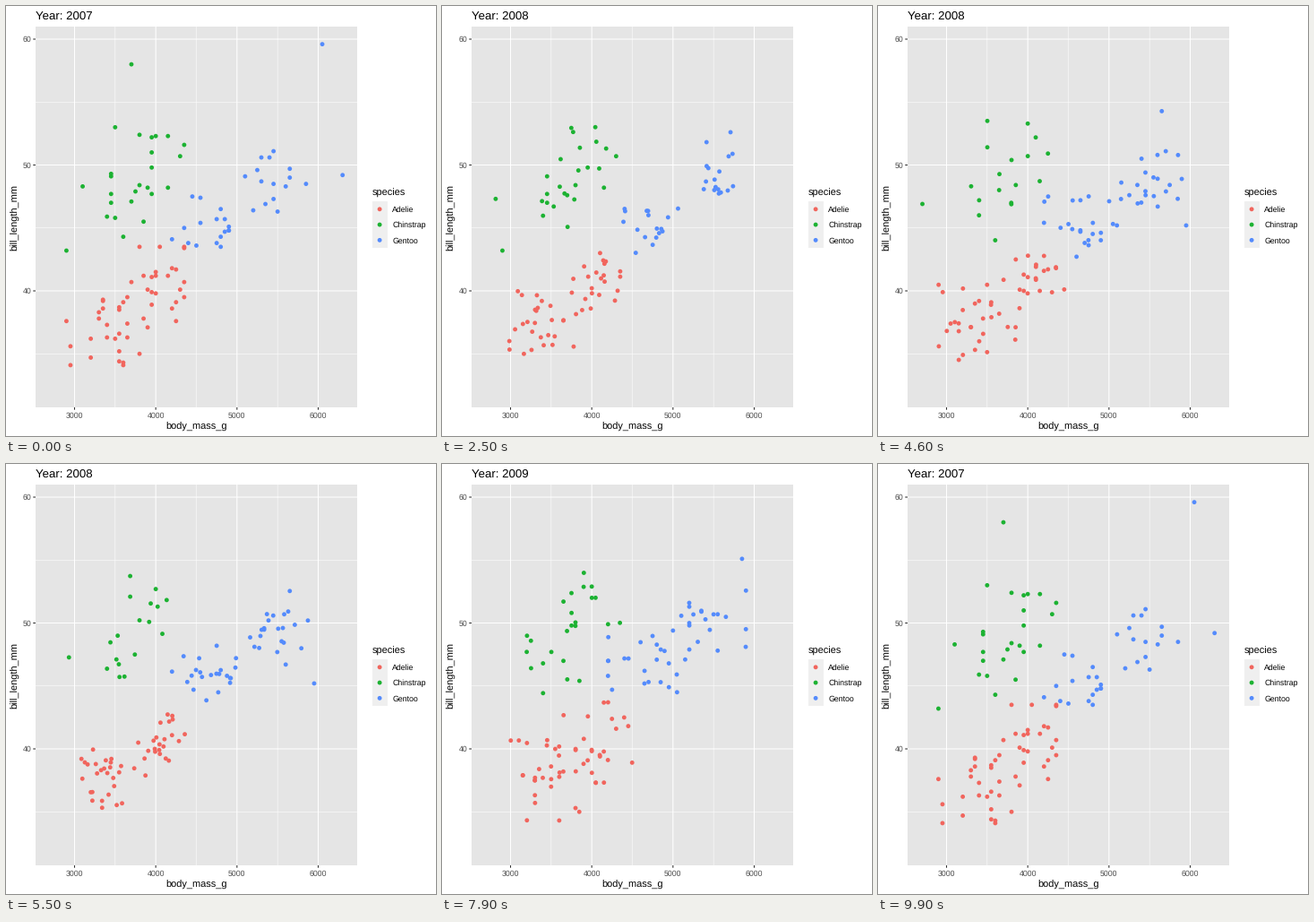
Write a matplotlib script that moves like this. It is 480 px wide and 480 px high and loops after 10 s.

```python
import numpy as np
import matplotlib.pyplot as plt
from matplotlib.animation import FuncAnimation
from matplotlib.patches import Rectangle

plt.rcParams["font.family"] = "Liberation Sans"
plt.rcParams["text.hinting"] = "none"

STAGE = 480
LEFT, RIGHT, TOP, BOTTOM = 33, 392, 23, 448
COLORS = {"Adelie": "#F1655D", "Chinstrap": "#1CB232", "Gentoo": "#548BFC"}
DOT = 4.85 ** 2
YEARS = (2007, 2008, 2009)
MOVES = ((11, 33), (45, 66), (78, 99))
TITLE_CHANGES = (23, 56, 90)

rng = np.random.default_rng(12)


def px(mass):
    return 76.5 + (mass - 3000) * 0.09067


def py(bill):
    return 37 + (60 - bill) * 14.05


def cloud(n, mass, bill, gap, noise):
    """Females and males alternate; males are heavier with longer bills."""
    sex = np.where(np.arange(n) % 2, 1, -1)
    e = np.clip(rng.normal(size=(n, 2)), -1.7, 1.7)
    pts = np.array([mass, bill]) + sex[:, None] * gap + e * noise
    return np.round(pts / (50, 0.1)) * (50, 0.1)


def species(counts, mass, bill, gap, noise, rise):
    """One cloud per year; bills are longer in the last year by `rise`."""
    bills = (bill, bill, bill + rise)
    return [cloud(n, mass, b, gap, noise) for n, b in zip(counts, bills)]


STATES = {
    "Adelie": species((49, 50, 52), 3700, 38.8, (330, 1.5), (270, 1.9), 0.2),
    "Chinstrap": species((26, 18, 24), 3740, 48.8, (190, 2.1), (260, 1.6), 0.4),
    "Gentoo": species((34, 45, 43), 5070, 46.9, (390, 1.8), (270, 1.4), 1.5),
}

# The few outliers that shape the silhouette.
gentoo, chinstrap = STATES["Gentoo"], STATES["Chinstrap"]
gentoo[0][17] = 6300, 49.2
gentoo[0][33] = 6050, 59.6
gentoo[1][29] = 5650, 54.3
gentoo[1][44] = 5950, 45.2
gentoo[2][35] = 5850, 55.1
chinstrap[0][17] = 3700, 58
chinstrap[0][22] = 2900, 43.2
chinstrap[1][12] = 2700, 46.9

fig = plt.figure(figsize=(STAGE / 72, STAGE / 72), dpi=72, facecolor="white")
ax = fig.add_axes([0, 0, 1, 1])
ax.set_xlim(0, STAGE)
ax.set_ylim(STAGE, 0)
ax.axis("off")


def box(x, y, w, h, color):
    ax.add_patch(Rectangle((x, y), w, h, fc=color, lw=0, zorder=0))


def line(x, y, color, width):
    ax.plot(x, y, color=color, lw=width, solid_capstyle="butt",
            snap=False, zorder=1)


def label(x, y, text, size, color="black", **kw):
    return ax.text(x, y, text, fontsize=size, color=color, va="baseline", **kw)


box(LEFT, TOP, RIGHT - LEFT, BOTTOM - TOP, "#E5E5E5")
for mass in (3500, 4500, 5500):
    line([px(mass)] * 2, [TOP, BOTTOM], "white", 0.53)
for bill in (35, 45, 55):
    line([LEFT, RIGHT], [py(bill)] * 2, "white", 0.53)
for mass in (3000, 4000, 5000, 6000):
    line([px(mass)] * 2, [TOP, BOTTOM], "white", 1.07)
    line([px(mass)] * 2, [BOTTOM, BOTTOM + 2.75], "#333333", 1.07)
    label(px(mass), 460.3, str(mass), 8.8, "#4D4D4D", ha="center")
for bill in (40, 50, 60):
    line([LEFT, RIGHT], [py(bill)] * 2, "white", 1.07)
    line([LEFT - 2.75, LEFT], [py(bill)] * 2, "#333333", 1.07)
    label(28.3, py(bill) + 3.2, str(bill), 8.8, "#4D4D4D", ha="right")

label((LEFT + RIGHT) / 2, 472.6, "body_mass_g", 11, ha="center")
label(13.5, (TOP + BOTTOM) / 2, "bill_length_mm", 11, ha="center",
      rotation=90, rotation_mode="anchor")
title = label(LEFT, 15, "", 13.2)

label(408.5, 212, "species", 11)
key_y = 226.8 + 17.28 * np.arange(3)
box(408.5, 218.2, 17.28, 3 * 17.28, "#EFEFEF")
ax.scatter([417.1] * 3, key_y, s=DOT, c=list(COLORS.values()), lw=0, zorder=3)
for y, name in zip(key_y, COLORS):
    label(431.3, y + 3.2, name, 8.8)

dots = ax.scatter([], [], s=DOT, lw=0, zorder=3)


def points(states, frame):
    for k, (start, end) in enumerate(MOVES):
        if frame <= start:
            return states[k]
        if frame < end:
            a, b = states[k], states[(k + 1) % 3]
            u = (1 - np.cos(np.pi * (frame - start) / (end - start))) / 2
            n = min(len(a), len(b))
            now = a.copy()  # unpaired rows wait until the move is over
            now[:n] += u * (b[:n] - a[:n])
            return now
    return states[0]


def update(frame):
    groups = {name: points(states, frame) for name, states in STATES.items()}
    mass, bill = np.vstack(list(groups.values())).T
    dots.set_offsets(np.column_stack([px(mass), py(bill)]))
    dots.set_facecolor([COLORS[n] for n, p in groups.items() for _ in p])
    year = YEARS[sum(frame >= t for t in TITLE_CHANGES) % 3]
    title.set_text(f"Year: {year}")
    return dots, title


anim = FuncAnimation(fig, update, frames=100, interval=100,
                     repeat=True, repeat_delay=0, blit=False)
plt.show()
```
